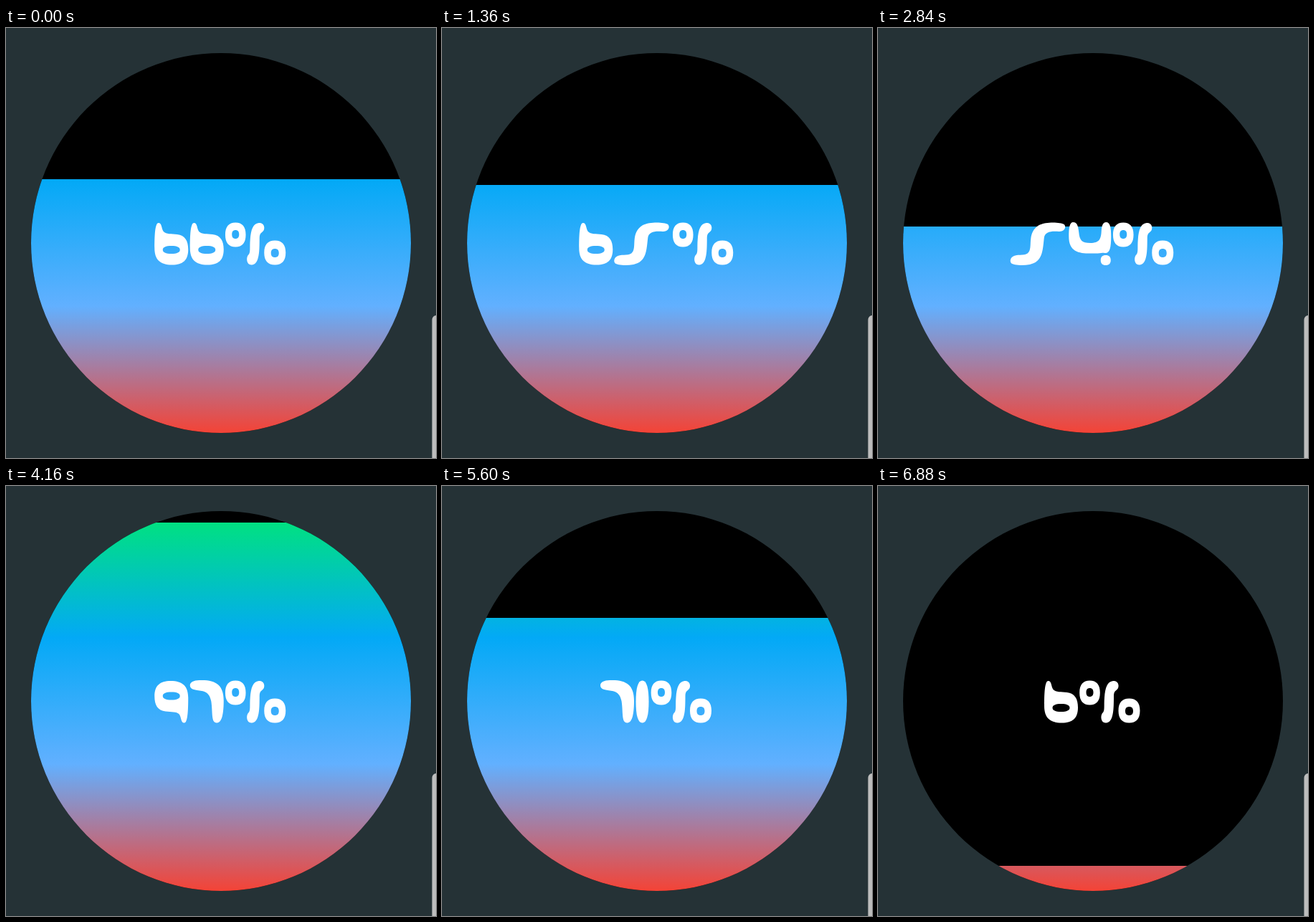
Recreate the animation shown at these times as an HTML page with a canvas. Size 600 px wide and 600 px high, loop 6920 ms.

```html
<!DOCTYPE html>
<html>
<head>
<meta charset="utf-8">
<style>
  html, body { margin: 0; width: 100%; height: 100%; overflow: hidden; background: #253236; }
  canvas { display: block; width: 600px; height: 600px; }
</style>
</head>
<body>
<canvas id="stage" width="600" height="600"></canvas>
<script>
const ctx = document.getElementById('stage').getContext('2d');
const LOOP = 6920, STEP = 40;
const CENTER = 300, RADIUS = 265, BOTTOM = 565;

// [time in ms, y of the liquid surface]
const LEVELS = [
  [0, 211], [360, 108], [480, 108], [800, 216.5], [1200, 215.5], [1920, 233],
  [2640, 268], [2840, 277], [3360, 441], [4080, 104], [4160, 50.8], [4240, 50.8],
  [4800, 267], [5160, 66], [5320, 66], [5600, 183.6], [5760, 249], [5960, 249],
  [6320, 77], [6680, 277], [6880, 530], [6920, 530]
];

// Soft rounded box as path data
function blob(cx, cy, rx, ry) {
  const kx = rx * 0.66, ky = ry * 0.66;
  return `M${cx} ${cy - ry}c${kx} 0 ${rx} ${ry - ky} ${rx} ${ry}` +
    `s${kx - rx} ${ry} ${-rx} ${ry}s${-rx} ${ky - ry} ${-rx} ${-ry}s${rx - kx} ${-ry} ${rx} ${-ry}z`;
}

const six = 'M6 1C11 1 10 9 13 13C17 17 24 16 32 17C43 18 47.500 26 47.500 38C47.500 53 40 59.500 25 59.500' +
  'C8 59.500 .5 52 .5 36C.5 20 1 1 6 1Z' + blob(24, 38.5, 12, 5.5);
const five = 'M5 47C12 44 22 48 26 41C31 33 23 14 40 4C50 -1 70 0 75 3C79 8 74 13 68 13' +
  'C57 12 48 13 47 22C45 40 45 55 27 59C17 61 4 60 1 57C-1 54 0 49 5 47Z';
const four = 'M6 0C12 0 13 6 14 14C15 25 18 29 30 29C43 29 45 23 45.500 12C46 4 48 0 52 0' +
  'C58 0 59 8 59 20C59 36 57 44 50 43C46 42 45 43.500 37 43.500C18 44 0 44 0 20C0 8 1 0 6 0Z' +
  blob(51.5, 53, 7, 7);
const seven = 'M13 0C35 -1 47 6 47 28C47 45 45 59.500 37.500 59.500C29 59.500 32 45 29.500 29' +
  'C27 16 19 15 10 14C3 13 0 11 0 7C0 3 5 0 13 0Z';
const three = 'M10 1C30 -1 45 2 45 16C45 22 43 26 40 29C45 32 47 36 47 43C47 56 36 60 12 59.500' +
  'C3 59 0 56 0 52C0 47 5 45 12 46C24 47 31 45 30 40C29 36 23 36 17 35C10 34 10 26 17 25' +
  'C24 25 29 23 29 19C28 14 20 15 10 14C2 13 0 10 0 7C0 3 3 1 10 1Z';
const slash = 'M47 1C53 0 56 6 54 11C52 15 48 14 48 22C48 40 48 59 37 59.500' +
  'C30 60 29 50 32 46C36 43 34 36 35 24C36 10 39 2 47 1Z';
const percent = blob(14.5, 17.5, 14.3, 17) + blob(14.5, 17, 5, 6) + slash +
  blob(69.5, 42.5, 15, 17) + blob(69.5, 43, 5.5, 6);

function glyph(data, advance, matrix) {
  const path = new Path2D();
  path.addPath(new Path2D(data), matrix);
  return { path, advance };
}

const GLYPHS = {
  0: glyph(blob(24, 30, 23.5, 29.5) + blob(24, 30, 9, 12), 49.5),
  1: glyph(blob(9.5, 30, 9, 29.5), 21.5),
  2: glyph(five, 81.5, new DOMMatrix([-1, 0, 0, 1, 78, 0])),
  3: glyph(three, 49.5),
  4: glyph(four, 61.5),
  5: glyph(five, 81.5),
  6: glyph(six, 49.5),
  7: glyph(seven, 49),
  8: glyph(blob(24, 17, 21, 17) + blob(24, 16.5, 9, 5) + blob(24, 43, 23.5, 17) + blob(24, 43.5, 11, 5), 49.5),
  9: glyph(six, 50, new DOMMatrix([-1, 0, 0, -1, 48, 60.5])),
  '%': glyph(percent, 84.5)
};
// Overlapping bowls of the eight need a solid waist
GLYPHS[8].path.addPath(new Path2D('M10 26H38V34H10Z'));

const liquid = ctx.createLinearGradient(0, CENTER - RADIUS, 0, BOTTOM);
['#00e676', '#03a9f6', '#62b0ff', '#f44336'].forEach((color, i) => liquid.addColorStop(i / 3, color));

function levelAt(t) {
  const i = LEVELS.findIndex(key => key[0] > t);
  const [t0, y0] = LEVELS[i - 1], [t1, y1] = LEVELS[i];
  return y0 + (y1 - y0) * (t - t0) / (t1 - t0);
}

function drawLabel(text) {
  const glyphs = [...text].map(c => GLYPHS[c]);
  let x = 298.5 - glyphs.reduce((sum, g) => sum + g.advance, 0) / 2;
  ctx.fillStyle = '#fff';
  for (const g of glyphs) {
    ctx.save();
    ctx.translate(x, 271);
    ctx.fill(g.path, 'evenodd');
    ctx.restore();
    x += g.advance;
  }
}

function draw(t) {
  const y = levelAt(t);

  ctx.fillStyle = '#253236';
  ctx.fillRect(0, 0, 600, 600);

  ctx.fillStyle = '#bdbdbd';
  ctx.beginPath();
  ctx.roundRect(594.5, 401, 20, 220, 6);
  ctx.fill();

  ctx.fillStyle = '#000';
  ctx.beginPath();
  ctx.arc(CENTER, CENTER, RADIUS, 0, Math.PI * 2);
  ctx.fill();

  ctx.save();
  ctx.beginPath();
  ctx.rect(0, Math.round(y), 600, 600);
  ctx.clip();
  ctx.fillStyle = liquid;
  ctx.beginPath();
  ctx.arc(CENTER, CENTER, RADIUS, 0, Math.PI * 2);
  ctx.fill();
  ctx.restore();

  drawLabel(Math.floor((BOTTOM - y) / (2 * RADIUS) * 100) + '%');
}

const start = performance.now();
function tick() {
  const t = (performance.now() - start) % LOOP;
  draw(Math.floor(t / STEP) * STEP);
  requestAnimationFrame(tick);
}
tick();
</script>
</body>
</html>
```
